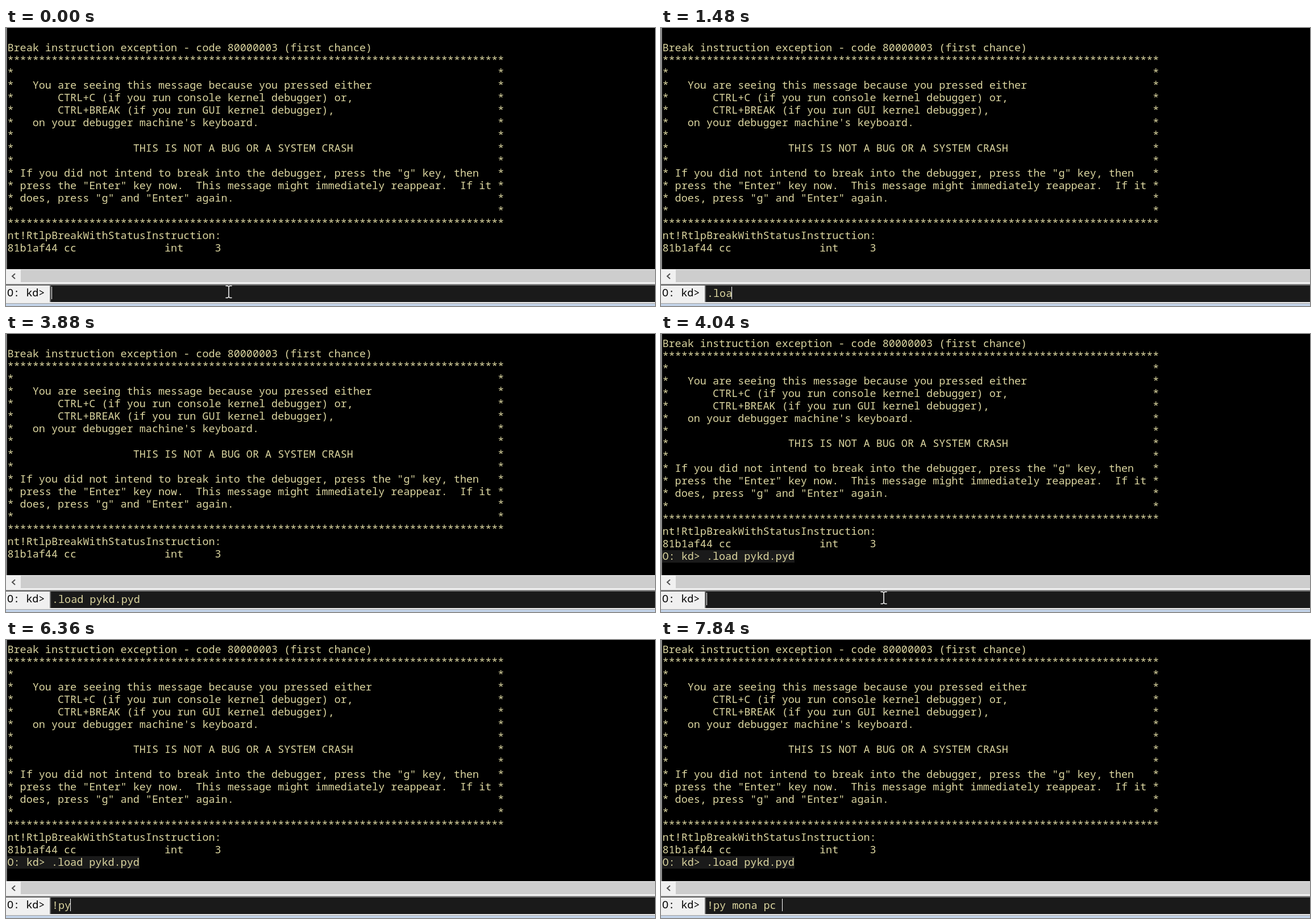
Write an HTML page with a canvas that moves like this. It is 1142 by 490 pixels and loops after 8 s.

```html
<!DOCTYPE html>
<html lang="en">
<head>
<meta charset="utf-8">
<title>Kernel debugger session</title>
<style>
html, body { margin: 0; height: 100%; overflow: hidden; background: #000; }
canvas { display: block; }
</style>
</head>
<body>
<canvas id="stage" width="1142" height="490"></canvas>
<script>
const ctx = document.getElementById('stage').getContext('2d');
const LOOP = 8000, CHAR = 11.064, LINE = 22.07, INK = '#dcd6a0', FIELD = '#1a1a1a';
const ENTER = 4040, PROMPT = 'O: kd>', COMMAND = '.load pykd.pyd', NEXT = '!py mona pc ';

const boxed = (text = '') => '*' + (' ' + text).padEnd(77) + '*';
const stars = '*'.repeat(79);
const output = [
  'Break instruction exception - code 80000003 (first chance)',
  stars,
  boxed(),
  boxed('  You are seeing this message because you pressed either'),
  boxed('      CTRL+C (if you run console kernel debugger) or,'),
  boxed('      CTRL+BREAK (if you run GUI kernel debugger),'),
  boxed("  on your debugger machine's keyboard."),
  boxed(),
  boxed(' '.repeat(18) + 'THIS IS NOT A BUG OR A SYSTEM CRASH'),
  boxed(),
  boxed('If you did not intend to break into the debugger, press the "g" key, then'),
  boxed('press the "Enter" key now.  This message might immediately reappear.  If it'),
  boxed('does, press "g" and "Enter" again.'),
  boxed(),
  stars,
  'nt!RtlpBreakWithStatusInstruction:',
  '81b1af44 cc              int     3'
];

// Moment of each key press, in ms
const commandKeys = [1080, 1200, 1360, 1480, 1560, 1720, 1960, 2160, 2400, 2560, 2760, 2960, 3200, 3320];
const nextKeys = [5600, 6040, 6360, 6680, 6840, 6960, 7120, 7240, 7400, 7520, 7680, 7840];
const caretOff = [[320, 840], [3880, 4040], [4560, 5040]];
const pointerOff = [[960, 4040], [5600, LOOP]];

const within = (spans, t) => spans.some(([from, to]) => t >= from && t < to);

function rect(x, y, w, h, color) {
  ctx.fillStyle = color;
  ctx.fillRect(x, y, w, h);
}

function write(text, x, y, color = INK) {
  ctx.fillStyle = color;
  ctx.fillText(text, x, y);
}

function drawOutput(entered) {
  const top = entered ? 22.6 : 41;
  output.forEach((line, i) => write(line, 2.5, top + i * LINE));
  if (entered) {
    rect(2, 381, 233, 22, FIELD);
    write(PROMPT + ' ' + COMMAND, 2.5, top + output.length * LINE);
  }
  rect(0, 0, 1, 425, '#a0a0a0');
  rect(1, 0, 1, 425, '#696969');
}

function drawFrame() {
  rect(0, 425, 1142, 65, '#f0f0f0');
  rect(26, 426, 1116, 22, '#cdcdcd');
  rect(0, 451, 1142, 1, '#a0a0a0');
  rect(0, 452, 1142, 2, '#696969');
  rect(0, 454, 77, 29, '#f0f0f0');
  rect(77, 454, 2, 29, '#696969');
  rect(79, 454, 1063, 29, FIELD);
  rect(0, 485, 1142, 1, '#a0a0a0');
  rect(0, 486, 1142, 4, '#c3d3e8');
  ctx.strokeStyle = '#505050';
  ctx.lineWidth = 2;
  ctx.stroke(new Path2D('M16 433L11 437.5L16 442'));
  write(PROMPT, 2, 472.6, '#000');
}

function drawPointer() {
  ctx.strokeStyle = '#fff';
  ctx.lineWidth = 1.5;
  ctx.stroke(new Path2D('M386.5 454.5H390L392 456L394 454.5H397.5M392 456V474M386.5 475.5H390L392 474L394 475.5H397.5'));
}

function draw(now) {
  const t = now % LOOP, entered = t >= ENTER;
  const keys = entered ? nextKeys : commandKeys;
  const typed = keys.filter(k => t >= k).length;
  ctx.font = '18.44px "Noto Sans Mono", monospace';
  rect(0, 0, 1142, 490, '#000');
  drawOutput(entered);
  drawFrame();
  write((entered ? NEXT : COMMAND).slice(0, typed), 81, 473.6);
  if (!within(caretOff, t)) rect(Math.round(80 + typed * CHAR), 456, 1, 22, '#fff');
  if (!within(pointerOff, t)) drawPointer();
  requestAnimationFrame(draw);
}
requestAnimationFrame(draw);
</script>
</body>
</html>
```
